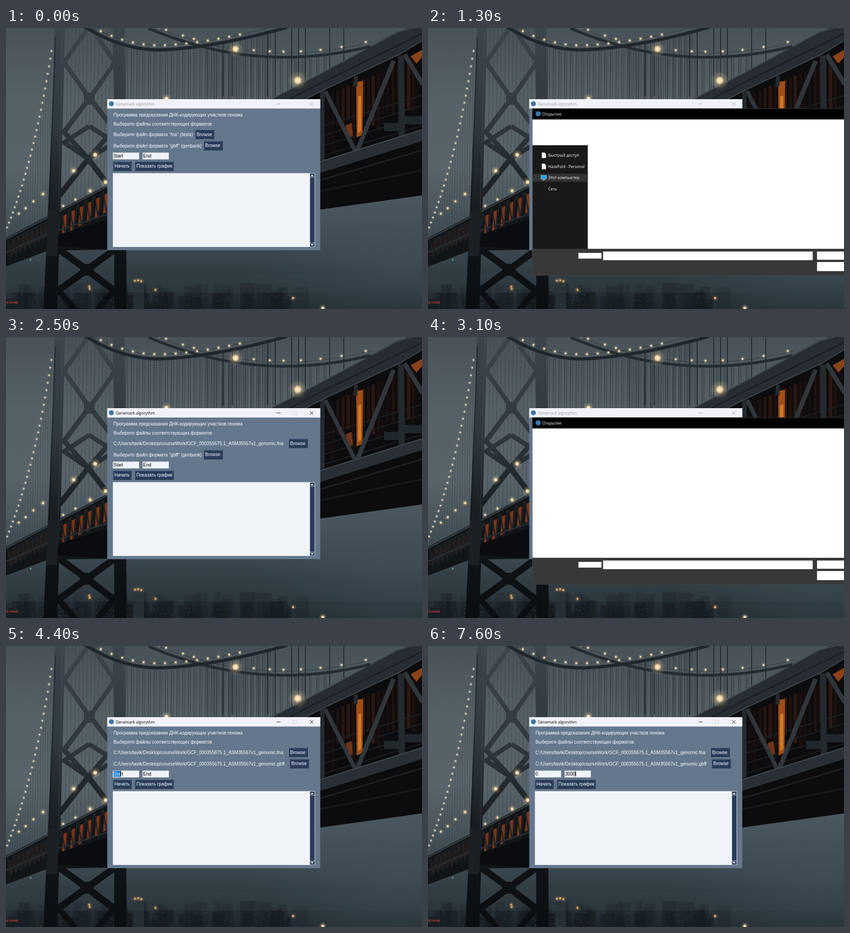
Recreate the animation shown at these times as an HTML page with a canvas. Size 910x616 px, loop 8 s.

```html
<!DOCTYPE html>
<html lang="ru">
<head>
<meta charset="utf-8">
<title>Genemark algorythm</title>
<style>
html, body { margin: 0; width: 100%; height: 100%; overflow: hidden; background: #465158; }
canvas, svg { position: absolute; left: 0; top: 0; width: 910px; height: 616px; }
text { font-family: "Open Sans", "Noto Sans", sans-serif; font-size: 8.65px; fill: #fff; white-space: pre; }
.tk text { font-family: "Liberation Sans", Arial, sans-serif; font-size: 10.03px; }
</style>
</head>
<body>
<canvas id="photo" width="910" height="616"></canvas>
<svg id="ui" viewBox="0 0 910 616"></svg>
<script>
// ---------- backdrop ----------
const c = document.getElementById('photo').getContext('2d');
let seed = 11;
const rnd = () => (seed = (seed * 16807) % 2147483647) / 2147483647;

function vgrad(y0, y1, ...stops) {
  const g = c.createLinearGradient(0, y0, 0, y1);
  stops.forEach(([p, col]) => g.addColorStop(p, col));
  return g;
}
function poly(fill, ...p) {
  c.fillStyle = fill;
  c.beginPath();
  for (let i = 0; i < p.length; i += 2) c.lineTo(p[i], p[i + 1]);
  c.fill();
}
function line(col, w, ...p) {
  c.strokeStyle = col;
  c.lineWidth = w;
  c.beginPath();
  for (let i = 0; i < p.length; i += 2) c.lineTo(p[i], p[i + 1]);
  c.stroke();
}
function curve(fn, x0, x1, dy, col, w) {
  const p = [];
  for (let x = x0; x <= x1; x += 5) p.push(x, fn(x) + dy);
  line(col, w, ...p);
}
function glow(x, y, r, rgb = '255,222,165') {
  const g = c.createRadialGradient(x, y, 0, x, y, r * 3);
  g.addColorStop(0, 'rgba(255,248,225,1)');
  g.addColorStop(.28, `rgba(${rgb},.9)`);
  g.addColorStop(.45, `rgba(${rgb},.28)`);
  g.addColorStop(1, `rgba(${rgb},0)`);
  c.fillStyle = g;
  c.fillRect(x - r * 3, y - r * 3, r * 6, r * 6);
}
const near = x => x < 335 ? 48 - 43 * ((335 - x) / 150) ** 2 : 48 - 48 * ((x - 335) / 275) ** 1.6;
const far = x => x < 610 ? 64 - 64 * ((610 - x) / 300) ** 2 : 64 - 22 * ((x - 610) / 180) ** 2;
const deck = x => 460 - .515 * x;
const side = s => [101 * (1 - s) ** 2 + 124 * s * (1 - s) - 5 * s * s,
  40 * (1 - s) ** 2 + 600 * s * (1 - s) + 455 * s * s];

function sky() {
  c.fillStyle = vgrad(0, 616, [0, '#485258'], [.25, '#566166'], [.5, '#59646a'], [.68, '#47535a'],
    [.82, '#38444b'], [.92, '#29333a'], [1, '#1f272d']);
  c.fillRect(0, 0, 910, 616);
  const g = c.createRadialGradient(860, 500, 10, 860, 500, 330);
  g.addColorStop(0, 'rgba(66,82,91,.55)');
  g.addColorStop(1, 'rgba(66,82,91,0)');
  c.fillStyle = g;
  c.fillRect(400, 300, 510, 316);
}
function city() {
  for (let i = 0; i < 85; i++) {
    const x = rnd() * 700 * (.5 + rnd() * .6), w = 10 + rnd() * 20, h = 12 + rnd() * 46;
    c.fillStyle = `rgba(19,25,30,${.2 + rnd() * .3})`;
    c.fillRect(x, 616 - h, w, h);
    for (let k = 0; k < 9; k++) {
      c.fillStyle = `rgba(225,${150 + rnd() * 60},110,${rnd() * .45})`;
      c.fillRect(x + rnd() * w, 616 - rnd() * h, 1.2, 1.2);
    }
  }
  c.fillStyle = '#262f35';
  c.fillRect(278, 558, 24, 58);
  c.fillRect(625, 578, 7, 38);
  for (const [x, y] of [[282, 554], [289, 553], [296, 555], [182, 567], [183, 572], [327, 574], [628, 592]])
    glow(x, y, 2.2, '240,165,85');
  glow(693, 614, 3);
  c.fillStyle = 'rgba(60,74,82,.2)';
  c.fillRect(0, 540, 910, 40);
  c.fillStyle = '#e2402f';
  c.font = 'bold 5px "Liberation Sans", sans-serif';
  c.fillText('LATE COFFEE', -8, 604);
}
function hangers() {
  for (let x = 10; x < 100; x += 5.5) {
    let s = 0;
    while (s < 1 && side(s)[0] > x) s += .01;
    line('rgba(42,50,55,.5)', .8, x, side(s)[1], x - 2, deck(x));
  }
  for (let x = 132; x < 226; x += 8.5) line('rgba(45,53,58,.55)', 1, x + 4, 0, x - 3, deck(x));
  for (let x = 262; x < 575; x += 12.5) {
    const y = near(x);
    line('rgba(33,40,45,.7)', 1.1, x, y, x - 1, 158);
    line('rgba(33,40,45,.55)', 1, x + 4, y, x + 3.5, 158);
  }
  for (let x = 440; x < 700; x += 16) {
    line('rgba(33,40,45,.8)', 1.2, x, far(x), x, 160);
    line('rgba(33,40,45,.6)', 1, x + 4, far(x), x + 4, 160);
  }
  for (const x of [475, 495, 572, 589, 625, 640, 655, 708, 739]) line('#22292e', 2, x, x > 600 ? 0 : near(x), x, 150);
}
function tower() {
  const steel = vgrad(0, 616, [0, '#3b454b'], [.35, '#30383d'], [.55, '#1e2428'], [.75, '#101417'], [1, '#0b0e11']);
  for (const p of [[183, -65, 183, 155], [182, 155, 180, 287]]) {
    const [x0, y0, x1, y1] = p;
    line(steel, 10, x0, y0 + 60, 127, (y0 + y1) / 2 + 30, x1, y1);
    line(steel, 10, x0, y0 + 60, 238, (y0 + y1) / 2 + 30, x1, y1);
  }
  line(steel, 12, 180, 287, 222, 342);
  line(steel, 12, 180, 287, 116, 368);
  line(steel, 11, 183, 153, 127, 228, 180, 287, 236, 222, 183, 153);
  poly(steel, 170, 142, 195, 142, 193, 168, 171, 168);
  poly(steel, 233, 0, 259, 0, 261, 160, 264, 616, 237, 616, 236, 160);
  line(steel, 15, 114, 484, 177, 530, 240, 484);
  line(steel, 15, 108, 580, 177, 530, 242, 580);
  line(steel, 13, 108, 568, 152, 618);
  line(steel, 13, 242, 568, 200, 618);
  poly(steel, 162, 517, 192, 517, 192, 543, 162, 543);
  poly(steel, 107, 0, 129, 0, 126, 130, 119, 400, 112, 616, 82, 616, 92, 400, 103, 130);
  line('rgba(90,102,108,.22)', 2, 124, 0, 114, 400);
  line('rgba(10,13,15,.35)', 3, 108, 20, 94, 400);
}
function leftDeck() {
  poly('#121518', 0, 460, 92, 412, 222, 344, 222, 486, 92, 488, 0, 523);
  for (let x = 4; x < 222; x += x < 100 ? 10 : 18) {
    const y = deck(x), h = x < 100 ? 32 : 45, a = x < 100 ? .12 : .85;
    poly(`rgba(146,58,24,${a})`, x + 4, y + 14, x + 11, y + 11, x + 8, y + 8 + h, x, y + 12 + h);
    line('#1d2226', 3, x, y + 8, x + 8, y + h + 10, x + 16, y);
  }
  line('#343c41', 3, 0, 463, 222, 347);
  line('#262c30', 3, 0, 492, 90, 452, 222, 408);
  poly('#0a0c0f', 118, 452, 222, 420, 222, 486, 105, 478);
  poly('#1b2024', 93, 400, 117, 400, 112, 500, 88, 500);
}
function rightDeck() {
  poly('#0c0b0e', 575, 158, 690, 98, 860, 8, 880, 0, 910, 0, 910, 367, 687, 398, 687, 158);
  for (let x = 690; x < 910; x += 11) {
    const y = 150 - (x - 690) * .42;
    c.fillStyle = `rgba(92,44,20,${.1 + rnd() * .35})`;
    c.fillRect(x, y, 3 + rnd() * 5, 75 + rnd() * 55);
  }
  for (let k = 0; k < 4; k++) line('#1b2025', 2, 690, 215 + k * 22, 910, 148 + k * 22);
  poly('#a04d18', 766, 118, 781, 116, 780, 234, 767, 240);
  poly('#d07a28', 770, 150, 777, 148, 777, 225, 770, 230);
  poly('#6f3516', 743, 213, 756, 208, 759, 236, 748, 242);
  poly('#8a4318', 885, 62, 910, 48, 910, 64, 898, 78);
  for (const [x, y, w] of [[827, 222, 36], [868, 207, 42]]) {
    c.fillStyle = '#20272c';
    c.fillRect(x, y - 14, w, 18);
  }
  const beam = '#30363b';
  line(beam, 9, 698, 138, 765, 272);
  line(beam, 10, 848, 72, 768, 270);
  line(beam, 10, 872, 58, 912, 124);
  line('#24292d', 14, 864, 60, 866, 240);
  line('#24292d', 9, 766, 105, 764, 128);
  line('#24292d', 10, 692, 125, 692, 290);
  poly('#272d32', 575, 158, 690, 98, 855, 8, 885, 0, 910, 0, 910, 27, 862, 58, 690, 138, 650, 158);
  line('#434b51', 2, 580, 156, 690, 99, 856, 9, 910, -6);
  line('#1a1f23', 3, 620, 156, 690, 120, 862, 36, 910, 12);
  line('#3d454a', 2, 655, 156, 690, 138, 862, 57, 910, 28);
  poly('#292f34', 687, 292, 910, 222, 910, 248, 687, 318);
  line('#424a50', 2, 687, 293, 910, 223);
  line('#1c2125', 3, 687, 334, 910, 268);
  line('#15191d', 4, 687, 358, 910, 312);
}
function lights() {
  curve(far, 312, 800, 0, '#252c31', 6);
  curve(far, 330, 800, -9, 'rgba(45,53,58,.8)', 1);
  curve(near, 160, 615, 0, '#20272c', 7);
  curve(near, 170, 615, -10, 'rgba(45,53,58,.8)', 1);
  for (let x = 184; x < 530; x += 23.4) glow(x, near(x) - 10, 1.9);
  for (const x of [335, 350, 387, 411, 542, 577, 607, 645, 688, 734, 787]) glow(x, far(x) - 12, 1.9);
  for (let s = .02; s < 1; s += .033) glow(...side(s), 1.5, '235,222,190');
  for (const [x, y, r] of [[502, 46, 6], [638, 115, 7], [351, 155, 4], [195, 278, 4], [148, 313, 3.5],
    [184, 357, 3], [218, 338, 4], [152, 376, 2], [125, 390, 2], [81, 364, 2.5], [60, 380, 2], [43, 395, 2], [28, 407, 2]])
    glow(x, y, r);
  glow(54, 508, 1.2, '70,190,150');
}
[sky, city, hangers, tower, leftDeck, rightDeck, lights].forEach(f => f());

// ---------- interface ----------
const ui = document.getElementById('ui');
function el(tag, at, to) {
  const e = document.createElementNS('http://www.w3.org/2000/svg', tag);
  for (const k in at) e.setAttribute(k, at[k]);
  return to.appendChild(e);
}
const group = (to, at = {}) => el('g', at, to);
const box = (to, x, y, w, h, fill, at = {}) => el('rect', { x, y, width: w, height: h, fill, ...at }, to);
const path = (to, d, stroke = '#ddd', w = 1, fill = 'none') => el('path', { d, stroke, 'stroke-width': w, fill }, to);
const dot = (to, cx, cy, r, fill) => el('circle', { cx, cy, r, fill }, to);
function label(to, x, y, str, fill = '#fff', at = {}) {
  const t = el('text', { x, y, ...at }, to);
  t.style.fill = fill;
  t.textContent = str;
  return t;
}
const show = (e, on) => e.setAttribute('visibility', on ? 'inherit' : 'hidden');
const navy = '#283b5b', pale = '#f0f3f7';

function button(to, x, y, w, str) {
  const g = group(to);
  box(g, x, y, w, 20.5, '#10182a');
  box(g, x, y, w - 1, 19.5, '#76859a');
  const face = box(g, x + 1, y + 1, w - 2.3, 18.2, navy);
  const txt = label(g, x + 3.6, y + 13.8, str);
  return {
    move: nx => g.setAttribute('transform', `translate(${nx - x})`),
    press(on) {
      face.setAttribute('fill', on ? '#fff' : navy);
      txt.style.fill = on ? navy : '#fff';
    }
  };
}
function input(to, x) {
  box(to, x, 273, 57.5, 15, pale);
  path(to, `M${x} 288V273H${x + 57.5}`, '#8d99a8', .8);
  const mark = box(to, x + 1.5, 274, 0, 12.5, '#0078d7');
  const txt = label(to, x + 1.3, 284, '', '#000');
  const chosen = el('tspan', { fill: '#fff' }, txt), rest = el('tspan', { fill: '#000' }, txt);
  chosen.style.fill = '#fff';
  const bar = box(to, 0, 273.8, 1.3, 12.6, '#000');
  return (str, sel, caret) => {
    chosen.textContent = str.slice(0, sel);
    rest.textContent = str.slice(sel);
    const end = sel ? chosen.getComputedTextLength() : txt.getComputedTextLength();
    mark.setAttribute('width', sel ? end : 0);
    bar.setAttribute('x', x + 1.3 + end);
    show(bar, caret);
  };
}

// main window
const win = group(ui);
box(win, 221.5, 156, 466, 331, '#64778d');
box(win, 221.5, 156, 466, 20.5, '#f1f2f9');
dot(win, 230.5, 166, 5.5, '#3b77a8');
const title = label(win, 240, 169.5, 'Genemark algorythm');
const minBtn = path(win, 'M592 166.5h8.5');
const maxBtn = path(win, 'M628.5 163h7v7h-7z', '#ccc', .8);
const closeBtn = path(win, 'M665 162.8l7.5 7.5m0-7.5l-7.5 7.5');
const tk = group(win, { class: 'tk' });
label(tk, 235, 194, 'Программа предсказания ДНК-кодирующих участков генома');
label(tk, 235, 214.3, 'Выберите файлы соответствующих форматов');
const asks = ['Выберите файл формата "fna" (fasta)', 'Выберите файл формата "gbff" (genbank)'];
const stem = 'GCF_000355675.1_ASM35567v1_genomic';
const paths = ['fna', 'gbff'].map(x => `C:/Users/tavik/Desktop/courseWork/${stem}.${x}`);
const asked = [label(tk, 235, 236.8, ''), label(tk, 235, 261.6, '')];
const browse = [button(tk, 413.5, 222.8, 42, 'Browse'), button(tk, 432, 247.6, 42, 'Browse')];
const spots = [[413.5, 618], [432, 620.5]];
const fields = [input(tk, 233.7), input(tk, 298.7)];
button(tk, 233.7, 292.6, 41, 'Начать');
button(tk, 281.7, 292.6, 85, 'Показать график');
box(tk, 233.7, 318, 430.5, 162, pale);
path(tk, 'M233.7 480V318H664', '#8d99a8', .8);
box(tk, 664, 318, 12, 162, '#e4e8ed');
box(tk, 665.3, 319, 9.6, 160, '#10182a');
box(tk, 665.3, 319, 8.8, 7.5, navy);
box(tk, 665.3, 327.5, 8.8, 143, navy);
box(tk, 665.3, 472, 8.8, 7.3, navy);
path(tk, 'M665 327h10M665 471.3h10', '#dfe4ea');
path(tk, 'M666.5 325l3.3-4 3.3 4zM666.5 473.5l3.3 4 3.3-4z', 'none', 0, '#fff');

// file dialog
const dlg = group(ui);
box(dlg, 228, 176.5, 682, 366, '#383838');
box(dlg, 228, 176.5, 682, 24, '#000');
path(dlg, 'M910 176.8H228.3V542.3H910', '#4b4b4b', .7);
dot(dlg, 241, 188, 5.8, '#3b77a8');
label(dlg, 250, 191.6, 'Открытие');
const blank = group(dlg);
for (const b of [[228.5, 200.5, 682, 283.5], [329, 493, 50.5, 12.5], [383, 490, 458.5, 19], [851, 490, 60, 18], [851, 513, 60, 20]])
  box(blank, ...b, '#fff');

function sheet(to, x, y) {
  path(to, `M${x - 4} ${y - 6}h6l3 3v9h-9z`, '#aaa', .5, '#f4f4f4');
  path(to, `M${x + 2} ${y - 6}v3h3`, '#999', .6);
}
function screen(to, x, y) {
  box(to, x - 6, y - 5, 12, 8, '#2aa3ea', { stroke: '#9cd8fa', 'stroke-width': .7 });
  box(to, x - 3, y + 4, 6, 1.5, '#b9c4cc');
}
function picture(to, x, y) {
  box(to, x - 6, y - 4, 12, 8.5, '#eef4f8');
  path(to, `M${x - 5} ${y + 3}l3-4 3 3 2-2 2 3z`, 'none', 0, '#3f93c4');
}
const rough = group(dlg);
box(rough, 228.5, 257, 121, 227, '#191919');
box(rough, 228.5, 319.5, 121, 17.5, '#333');
sheet(rough, 253, 279);
sheet(rough, 253, 303.5);
screen(rough, 253, 328);
['Быстрый доступ', 'HazeFold - Personal', 'Этот компьютер', 'Сеть']
  .forEach((s, i) => label(rough, 263, 282 + i * 24.7, s));

const full = group(dlg);
box(full, 228.5, 200.5, 682, 284, '#191919');
box(full, 228.5, 232, 682, 25, '#1f1f1f');
box(full, 352, 257, 558, 227, '#202020');
path(full, 'M247 216h-9m4-4l-4 4 4 4M261 216h9m-4-4l4 4-4 4', '#aaa', 1.2);
path(full, 'M282 214.5l2.5 2.5 2.5-2.5', '#999');
path(full, 'M300 221v-9m-4 4l4-4 4 4', '#fff', 1.5);
path(full, 'M311 204.5H834V227.5H311zM815 204.5V227.5M910 204.5H844.5V227.5H910', '#535353');
path(full, 'M793.5 214.5l3 3 3-3', '#bbb', 1.2);
path(full, 'M825 214a3.6 3.6 0 1 0 .5 3M825.4 211.5v3h-3', '#bbb');
box(full, 314, 209, 10, 13, '#f6d568');
box(full, 320, 217, 4.5, 5, '#e9b83c');
path(full, 'M331 213.5l2.2 2.5-2.2 2.5M419 213.5l2.2 2.5-2.2 2.5M496 213.5l2.2 2.5-2.2 2.5', '#bbb');
label(full, 341, 219.3, 'Этот компьютер');
label(full, 429, 219.3, 'Рабочий стол');
label(full, 506, 219.3, 'courseWork');
label(full, 851, 219.3, 'Поиск: courseWork', '#8e8e8e');
label(full, 242, 247.8, 'Упорядочить');
path(full, 'M302.5 243h6l-3 3.5z', 'none', 0, '#ddd');
label(full, 332, 247.8, 'Новая папка');

const nav = group(full, { 'clip-path': 'inset(0)' });
const clip = el('clipPath', { id: 'navClip' }, el('defs', {}, ui));
box(clip, 228, 257, 108, 227, '#000');
nav.setAttribute('clip-path', 'url(#navClip)');
box(nav, 228.5, 437.5, 109, 17.5, '#333');
const icons = {
  film: y => { box(nav, 254.5, y - 5.5, 9.5, 11, '#6d7fc0'); path(nav, `M256 ${y - 5}v10M262.5 ${y - 5}v10`, '#222', 1.2); },
  doc: y => { sheet(nav, 259, y); path(nav, `M256.5 ${y}h5M256.5 ${y + 2.5}h5`, '#3f93c4'); },
  down: y => path(nav, `M257 ${y - 5}h4v5h3.5l-5.5 6-5.5-6h3.5z`, 'none', 0, '#3d9ae8'),
  note: y => { dot(nav, 257, y + 3.5, 2.2, '#2f9bf0'); path(nav, `M259 ${y + 3}v-8q0 3 4 4.5`, '#2f9bf0', 1.5); },
  cube: y => { box(nav, 254, y - 5, 11, 10, '#37b3d3'); box(nav, 257, y - 2, 5, 6, '#d9f3f8'); },
  desk: y => box(nav, 253, y - 4, 12.5, 8.5, '#1b9cf2'),
  disk: y => { box(nav, 253, y + 1, 12, 4, '#c9ced2'); box(nav, 254, y - 4, 4, 4, '#3d9ae8'); },
  pic: y => picture(nav, 259, y),
  cloud: y => dot(nav, 252.5, y, 5, '#1583d8'),
  pc: y => screen(nav, 252.5, y)
};
[['pic', 266, 'Изображени'], ['cloud', 291, 'HazeFold - Personal', 263], ['pc', 316, 'Этот компьютер', 263],
  ['film', 334.5, 'Видео'], ['doc', 353, 'Документы'], ['down', 371.5, 'Загрузки'], ['pic', 390, 'Изображения'],
  ['note', 408.7, 'Музыка'], ['cube', 427.3, 'Объемные объекты'], ['desk', 446, 'Рабочий стол'],
  ['disk', 464.5, 'Локальный диск']
].forEach(([icon, y, s, x = 269]) => { icons[icon](y); label(nav, x, y + 3.3, s); });
path(full, 'M327 269.5l2.5-2.5m-1-2.5l3.5 3.5m-2.5-3l2-2 2.5 2.5-2 2', '#bbb');
box(full, 337, 257, 11.5, 227, '#171717');
box(full, 337.2, 320, 11, 135, '#4d4d4d');
path(full, 'M340 265.5l2.7-2.7 2.7 2.7M340 475.5l2.7 2.7 2.7-2.7', '#999');
path(full, 'M351 257V484', '#2b2b2b');

const headHover = box(full, 352, 257, 269, 20, '#434343');
path(full, 'M621 257v20M732.5 257v20M825.5 257v20M887.5 257v20', '#636363');
path(full, 'M488 260.5l2.7-2.5 2.7 2.5', '#aaa');
[[366, 'Имя'], [626, 'Дата изменения'], [738, 'Тип'], [831, 'Размер']].forEach(([x, s]) => label(full, x, 270.3, s, '#dedede'));
const rowMark = box(full, 364, 0, 521, 15.6, '#777');
const py = 'Python file';
[[stem + '.fna', '22.04.2023 16:08', 'Файл "FNA"', '3 877'], [stem + '.gbff', '22.04.2023 16:08', 'Файл "GBFF"', '9 447'],
  ['genemark_algorithm.py', '22.04.2023 21:10', py, '8'], ['GUI.py', '22.04.2023 20:16', py, '16'],
  ['GUI_backup.py', '22.04.2023 20:58', py, '17'], ['GUI_backup2.py', '22.04.2023 22:11', py, '17'],
  ['GUI_backup2.spec', '22.04.2023 21:30', 'Файл "SPEC"', '1'], ['GUI_backup3.py', '22.04.2023 22:07', py, '17'],
  ['GUI_FINAL.py', '23.04.2023 19:44', py, '17'], ['main.py', '22.04.2023 21:08', py, '8']
].forEach(([name, date, type, size], i) => {
  const y = 289 + i * 16.3;
  if (type === py) box(full, 367, y - 5, 9.5, 10, '#d8d8d8');
  else sheet(full, 372, y);
  label(full, 382, y + 3.2, name);
  label(full, 626, y + 3.2, date, '#dedede');
  label(full, 738, y + 3.2, type, '#dedede');
  label(full, 882, y + 3.2, size + ' КБ', '#dedede', { 'text-anchor': 'end' });
});
box(full, 228.5, 484, 682, 58, '#383838');
label(full, 379, 502.5, 'Имя файла:', '#fff', { 'text-anchor': 'end' });
path(full, 'M383.5 490.5H841V508.5H383.5zM910 490.5H851.5V508.5H910', '#a5a5a5');
path(full, 'M831.5 498.5l3 3 3-3', '#ccc');
const fileName = label(full, 386.5, 503, '');
const fileCaret = box(full, 386.5, 492.5, 1, 13, '#fff');
label(full, 854, 502.8, 'ALL Files (*.*;*.*)');
path(full, 'M912 514H852V532H912', '#fff', 1.7);
label(full, 866, 526.2, 'Открыть');

// ---------- timeline ----------
const steps = [
  [0, { active: 0, press: 0, dlg: 0, head: 0, bar: 0, hover: 0, pick: 0, fna: 0, gbff: 0, start: 'Start', end: 'End', focus: -1, sel: 0, caret: 0 }],
  [800, { active: 1, press: 1 }], [900, { active: 0, press: 0 }],
  [1200, { dlg: 1 }], [1300, { dlg: 2 }], [1400, { dlg: 3, bar: 1 }],
  [1700, { head: 1 }], [1800, { head: .5 }], [1900, { head: 0, bar: 0 }],
  [2200, { hover: 1 }], [2300, { hover: 0, pick: 1 }], [2400, { dlg: 0, pick: 0, active: 1 }], [2500, { fna: 1 }],
  [2800, { press: 2 }], [2900, { press: 0, active: 0 }],
  [3000, { dlg: 1 }], [3200, { dlg: 2 }], [3300, { dlg: 3, bar: 1 }], [3400, { bar: 0 }],
  [3600, { hover: 2 }], [3700, { hover: 0, pick: 2 }], [3800, { dlg: 0, pick: 0, active: 1 }], [4100, { gbff: 1 }],
  [4400, { focus: 0, sel: 3, caret: 1 }], [4500, { sel: 5 }], [4900, { caret: 0 }],
  [5200, { start: '0', sel: 0, caret: 1 }], [5800, { caret: 0 }],
  [6000, { focus: 1, sel: 2, caret: 1 }], [6100, { sel: 3 }], [6500, { caret: 0 }],
  [6700, { end: '3', sel: 0, caret: 1 }], [6800, { end: '30' }], [7000, { end: '300' }], [7100, { end: '3000' }],
  [7400, { caret: 0 }], [7600, { caret: 1 }]
];
function draw(s) {
  const ink = s.active ? '#000' : '#999';
  title.style.fill = ink;
  minBtn.setAttribute('stroke', ink);
  closeBtn.setAttribute('stroke', ink);
  show(maxBtn, s.active);
  [s.fna, s.gbff].forEach((on, i) => {
    asked[i].textContent = on ? paths[i] : asks[i];
    browse[i].move(spots[i][on]);
    browse[i].press(s.press === i + 1);
  });
  [s.start, s.end].forEach((str, i) => {
    const on = s.focus === i;
    fields[i](str, on ? s.sel : 0, on && s.caret);
  });
  show(dlg, s.dlg);
  show(blank, s.dlg === 1 || s.dlg === 2);
  show(rough, s.dlg === 2);
  show(full, s.dlg === 3);
  headHover.setAttribute('opacity', s.head);
  const row = s.pick || s.hover;
  show(rowMark, row);
  rowMark.setAttribute('y', 281.2 + (row - 1) * 16.3);
  rowMark.setAttribute('fill', s.pick ? '#777' : '#4d4d4d');
  fileName.textContent = s.pick ? `${stem}.${s.pick === 1 ? 'fna' : 'gbff'}` : '';
  show(fileCaret, s.bar);
}
let last = -1;
function tick() {
  const t = performance.now() % 8000;
  const n = steps.filter(([at]) => at <= t).length;
  if (n !== last) draw(Object.assign({}, ...steps.slice(0, n).map(x => x[1])));
  last = n;
  requestAnimationFrame(tick);
}
tick();
</script>
</body>
</html>
```
